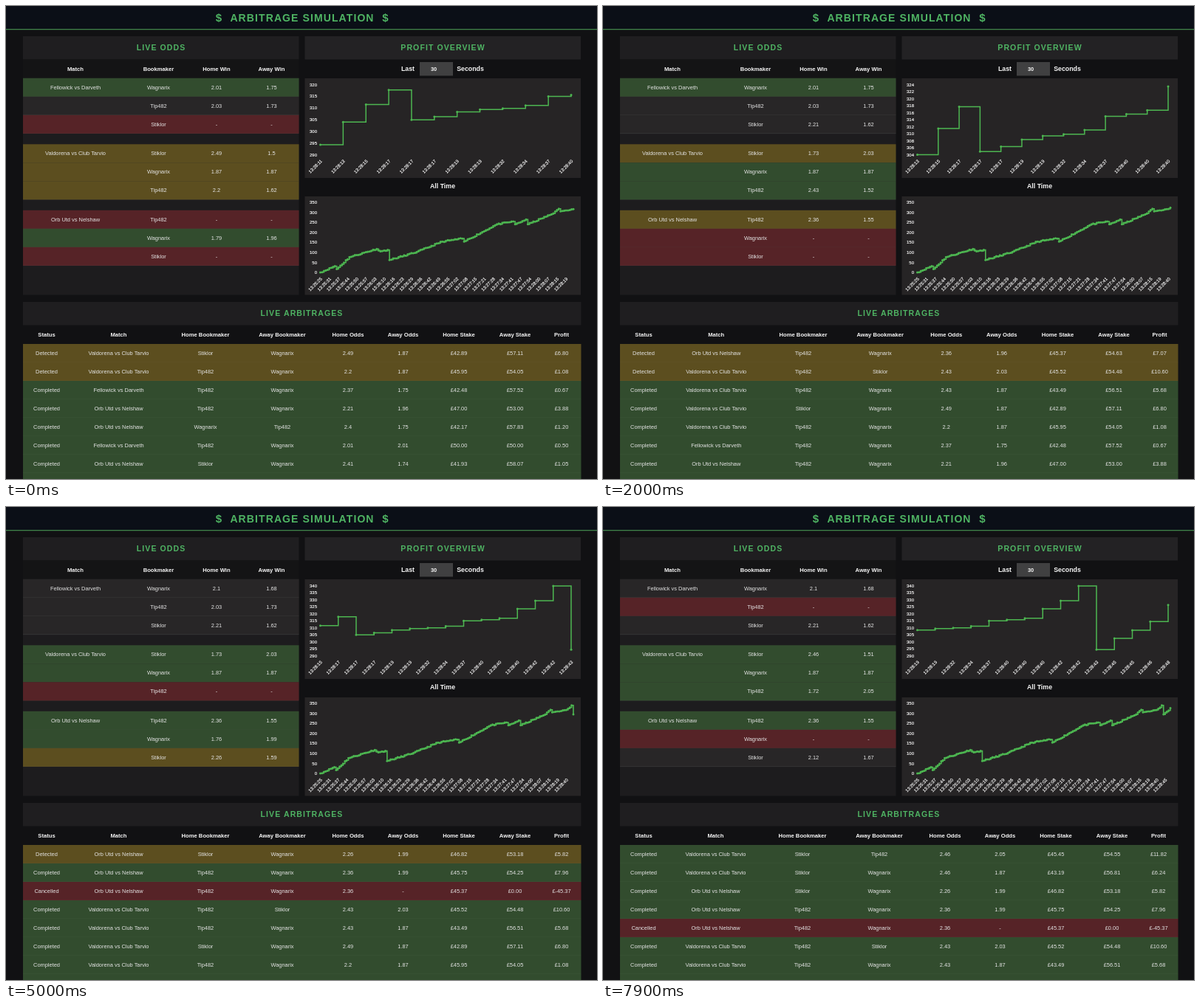
Recreate the animation shown at these times as an HTML page. Size 800x641 px, loop 8000 ms.

```html
<!DOCTYPE html>
<html lang="en">
<head>
<meta charset="utf-8">
<title>Arbitrage Simulation</title>
<style>
  html, body { margin: 0; width: 100%; height: 100%; overflow: hidden; background: #111113; }
  svg { display: block; width: 800px; height: 641px; }
  text { font-family: "Liberation Sans", Arial, sans-serif; fill: #e4e4e4; }
</style>
</head>
<body>
<svg id="stage" viewBox="0 0 800 641"></svg>
<script>
const LOOP = 8000;
const GREEN = '#4fb463';
const LINE = '#4db651';
const FILL = { g: '#324c2e', y: '#5c4e1f', r: '#562327', n: '#282627' };
const STATUS_FILL = { Detected: 'y', Completed: 'g', Cancelled: 'r' };

const BOOKS = { W: 'Wagnarix', T: 'Tip482', S: 'Stiklor' };
const MATCHES = {
  F: 'Fellowick vs Darveth',
  V: 'Valdorena vs Club Tarvio',
  O: 'Orb Utd vs Nelshaw'
};
const ODDS_ROWS = 'FW FT FS VS VW VT OT OW OS'.split(' ');

// Market log. "F T 2.01": new home odds, "-" withdraws them.
// "+ F T W": arbitrage found, home bet at T, away bet at W.
// "ok" / "no": oldest open arbitrage completes / fails. "@40": plot at 13:28:40.
const LOG = [
  [0, 'O S 2.41, O W 2.02, + O S W, ok, @19, O S -, F T 2.01, F W 1.75, + F T W, ok, @32'],
  [0, 'O W 2.4, O T 2.01, + O W T, ok, @34, O T 2.21, O W 1.79, + O T W, ok, @37'],
  [0, 'F T 2.37, F W 2.01, + F T W, ok, @40, F T 2.03, O T -'],
  [0, 'V W 1.87, V T 2.2, + V T W, V S 2.49, + V S W'],
  [600, 'ok, ok, @40, F S 2.21, V T 2.43, + V T W'],
  [1600, 'V S 1.73, + V T S, O T 2.36, + O T W, ok, O W -'],
  [2400, 'ok, @42'],
  [3300, 'no, @43, F W 2.1, O W 1.76, + O T W'],
  [4500, 'O S 2.26, + O S W, ok, V T -'],
  [5400, 'ok, @45, V S 2.46, + V S W'],
  [6500, 'ok, @46, V T 1.72, + V S T, F T 2.36'],
  [7500, 'ok, @48, F T -, O W -, O S 2.12']
];

// Turning points of the profit history: index, value
const TURNS = [
  [0, 0], [8, 31], [9, 17], [16, 76], [31, 117], [33, 105], [37, 112], [38, 62], [53, 102],
  [67, 154], [78, 169], [79, 154], [97, 240], [106, 254], [107, 240], [113, 264], [114, 240],
  [128, 294.3]
];
const EARLIER_GAINS = [[13, 9.7], [15, 7.5], [17, 6.2], [17, -12.8], [17, 1.4], [19, 2]];

// Seconds count from 13:25:00
const LAST_MINUTE = 180;
const CLOCK_AT_START = LAST_MINUTE + 40.6;

let seed = 11;
function random() {
  seed = (seed * 16807) % 2147483647;
  return seed / 2147483647;
}

const points = [{ value: 0, time: 25 }];
const trades = [];
const cells = {};
let recentFrom = 0;

function addGain(gain, time) {
  points.push({ value: points[points.length - 1].value + gain, time });
}

function buildHistory() {
  for (let k = 1; k < TURNS.length; k++) {
    const [i0, v0] = TURNS[k - 1], [i1, v1] = TURNS[k];
    for (let i = i0 + 1; i <= i1; i++) {
      const jitter = i === i1 ? 0 : (random() - 0.5) * 6;
      const value = v0 + (v1 - v0) * (i - i0) / (i1 - i0) + jitter;
      points.push({ value, time: 25 + 166 * i / 128 });
    }
  }
  for (const [second, profit] of EARLIER_GAINS) {
    addGain(profit, LAST_MINUTE + second);
    trades.push({ status: 'Completed', profit, plotted: true });
  }
  for (const key of ODDS_ROWS) cells[key] = { kind: 'r', home: '-', away: '-' };
}

// Both prices of a bookmaker share a 7% margin
function setOdds(match, book, home) {
  cells[match + book] = home === '-'
    ? { kind: 'r', home, away: '-' }
    : { kind: 'n', home, away: +(1 / (1.07 - 1 / home)).toFixed(2) };
}

function paint({ match, home, away }, kind) {
  cells[match + home].kind = cells[match + away].kind = kind;
}

function detect(match, home, away) {
  const h = cells[match + home].home, a = cells[match + away].away;
  const stake = 100 * a / (+h + a);
  const trade = { match, home, away, h, a, stake, cover: 100 - stake,
    profit: stake * h - 100, status: 'Detected' };
  trades.push(trade);
  paint(trade, 'y');
}

function settle(success) {
  const trade = trades.find(t => t.status === 'Detected');
  if (success) {
    trade.status = 'Completed';
    paint(trade, 'g');
  } else {
    Object.assign(trade, { status: 'Cancelled', a: '-', cover: 0, profit: -trade.stake });
  }
}

function plot(second, at) {
  for (const trade of trades) {
    if (trade.plotted || trade.status === 'Detected') continue;
    addGain(trade.profit, LAST_MINUTE + second);
    trade.plotted = true;
  }
  const oldest = CLOCK_AT_START + at / 1000 - 30;
  recentFrom = points.findIndex(p => p.time > oldest);
}

function run(command, at) {
  const words = command.split(' ');
  if (words[0] === '+') detect(...words.slice(1));
  else if (words[0][0] === '@') plot(+command.slice(1), at);
  else if (words.length === 1) settle(command === 'ok');
  else setOdds(...words);
}

const rect = (x, y, w, h, fill) =>
  `<rect x="${x}" y="${y}" width="${w}" height="${h}" fill="${fill}"/>`;

function label(str, x, y, size = 7.45, attrs = '') {
  return `<text x="${x}" y="${y + size * 0.35}" font-size="${size}" text-anchor="middle" ${attrs}>${str}</text>`;
}
const bold = (str, x, y, size = 7.65) =>
  label(str, x, y, size, 'font-weight="700" style="fill:#f6f6f6"');
const heading = (str, x, y, size = 10.5) =>
  label(str, x + 0.5, y, size, `font-weight="700" letter-spacing="1.1" style="fill:${GREEN}"`);
const axisLabel = (str, x, y, attrs = '') =>
  label(str, x, y, 6, `${attrs} style="text-anchor:end;fill:#fff;stroke:#fff;stroke-width:.15"`);

function tableRow(y, w, kind) {
  const edge = kind === 'n' ? '#3b3a3b' : 'rgba(255,255,255,.05)';
  return rect(23, y, w, 25.1, FILL[kind]) + rect(23, y + 24.6, w, 0.7, edge);
}

// Axis bounds on a step of 1, 2 or 5 times a power of ten
function niceAxis(values) {
  const low = Math.min(...values), high = Math.max(...values);
  const rough = (high - low) / 10;
  const power = 10 ** Math.floor(Math.log10(rough));
  const step = power * [1, 2, 5, 10].find(m => m * power >= rough);
  return [Math.floor(low / step) * step, Math.ceil(high / step) * step, step];
}

function clock(time) {
  const pad = n => String(Math.floor(n)).padStart(2, '0');
  return `13:${pad(25 + time / 60)}:${pad(time % 60)}`;
}

function chart(data, right, top, labelEvery, lineWidth) {
  const left = 425.5, bottom = top + 95;
  const [min, max, step] = niceAxis(data.map(p => p.value));
  const yOf = v => bottom - (bottom - top) * (v - min) / (max - min);
  let labels = '', path = '', dots = '';
  for (let v = min; v <= max; v += step) labels += axisLabel(v, 421, yOf(v));
  data.forEach(({ value, time }, i) => {
    const x = left + (right - left) * i / (data.length - 1), y = yOf(value);
    path += i ? `H${x.toFixed(2)}V${y.toFixed(2)}` : `M${x} ${y}`;
    dots += `<circle cx="${x.toFixed(2)}" cy="${y.toFixed(2)}" r="1.5"/>`;
    if (i % labelEvery === 0) {
      const turn = `transform="translate(${x + 1.3} ${bottom + 7.7}) rotate(-45)"`;
      labels += axisLabel(clock(time), 0, 0, turn);
    }
  });
  return labels + `<path d="${path}" fill="none" stroke="${LINE}" stroke-width="${lineWidth}"/>` +
    `<g fill="${LINE}">${dots}</g>`;
}

function panels() {
  return rect(0, 0, 800, 641, '#111113') +
    rect(0, 0, 800, 31, '#0b0f17') + rect(0, 31, 800, 1.3, '#3f8249') +
    heading('ARBITRAGE SIMULATION', 400.5, 15.7, 14) +
    heading('$', 288, 15.7, 15) + heading('$', 513.5, 15.7, 15) +
    rect(23, 41, 373.5, 31.5, '#1f1e20') + heading('LIVE ODDS', 209.5, 56.3) +
    rect(23, 72.5, 373.5, 25, '#141415') + rect(23, 97.5, 373.5, 294, '#1d1c1e') +
    rect(404.5, 41, 373.5, 31.5, '#232224') + heading('PROFIT OVERVIEW', 591, 56.3) +
    bold('Match', 94, 85.3) + bold('Bookmaker', 206.5, 85.3) +
    bold('Home Win', 285, 85.3) + bold('Away Win', 359.5, 85.3) +
    bold('Last', 544, 84.7, 8.8) + bold('Seconds', 628.5, 84.7, 8.8) +
    rect(560, 76, 45, 18.5, '#404041') + bold('30', 579, 85.3, 7.4) +
    rect(404.5, 98, 373.5, 135, '#262425') + bold('All Time', 591, 244, 8.8) +
    rect(404.5, 258, 373.5, 133.5, '#262425') +
    rect(23, 401, 755.5, 31.5, '#1f1e20') + heading('LIVE ARBITRAGES', 400, 416.3);
}

function oddsTable() {
  return ODDS_ROWS.map((key, i) => {
    const { kind, home, away } = cells[key];
    const y = 97.8 + Math.floor(i / 3) * 89.5 + (i % 3) * 25, mid = y + 12.5;
    return tableRow(y, 373.5, kind) +
      (i % 3 ? '' : label(MATCHES[key[0]], 94, mid)) +
      label(BOOKS[key[1]], 206.5, mid) + label(home, 285, mid) + label(away, 359.5, mid);
  }).join('');
}

const money = v => '£' + v.toFixed(2);

// Column: title, centre, drift when the profit column needs less room
const COLUMNS = [
  ['Status', 55, 0], ['Match', 152.5, 1.5], ['Home Bookmaker', 270, 2],
  ['Away Bookmaker', 374, 2.5], ['Home Odds', 463, 3.5], ['Away Odds', 537.5, 4.5],
  ['Home Stake', 613, 5], ['Away Stake', 689, 5], ['Profit', 752, 3]
];

function tradeTable() {
  const latest = trades.slice(-10).reverse();
  const widest = Math.max(...latest.map(t => money(t.profit).length));
  const columnX = COLUMNS.map(([, x, drift]) => x + drift * (7 - widest) / 2);
  const line = (write, texts, y) => texts.map((text, c) => write(text, columnX[c], y)).join('');
  const rows = latest.slice(0, 8).map((t, i) => {
    const y = 458 + i * 25;
    const texts = t.match ? [t.status, MATCHES[t.match], BOOKS[t.home], BOOKS[t.away],
      t.h, t.a, money(t.stake), money(t.cover), money(t.profit)] : [];
    return tableRow(y, 755.5, STATUS_FILL[t.status]) + line(label, texts, y + 12.5);
  });
  // Passing only three arguments keeps each writer's default size
  return line(bold, COLUMNS.map(c => c[0]), 445.3) + rows.join('');
}

buildHistory();
const scenes = LOG.map(([at, commands]) => {
  commands.split(', ').forEach(command => run(command, at));
  const markup = panels() + oddsTable() + chart(points.slice(recentFrom), 765, 106.5, 1, 1.5) +
    chart(points, 768, 266, 5, 1.6) + tradeTable();
  return { at, markup };
});

const stage = document.getElementById('stage');
const start = performance.now();
let shown;

function update(now) {
  const t = Math.max(0, now - start) % LOOP;
  const scene = scenes.filter(s => s.at <= t).pop();
  if (scene !== shown) {
    stage.innerHTML = scene.markup;
    shown = scene;
  }
  requestAnimationFrame(update);
}
update(start);
</script>
</body>
</html>
```
